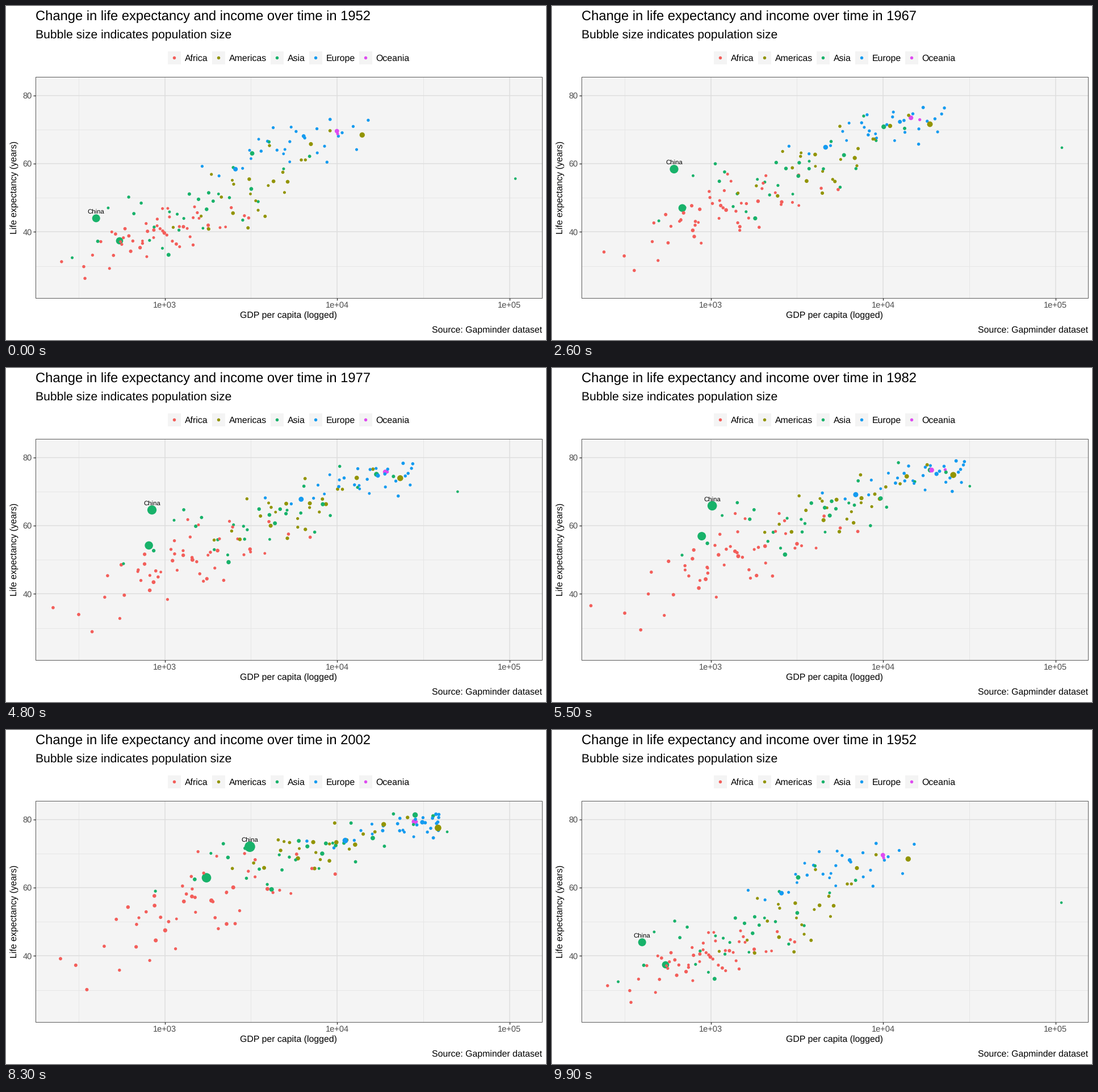
A matplotlib script for the animation above (10000 ms loop, 951 px wide and 589 px high).

```python
import numpy as np
import matplotlib.pyplot as plt
from matplotlib.animation import FuncAnimation
from matplotlib.patches import Rectangle

W, H, DPI = 951, 589, 64
PT = 72 / DPI                       # points per pixel
plt.rcParams.update({"font.family": "Liberation Sans", "text.hinting": "none"})

YEARS = np.arange(1952, 2008, 5)
SPAN = (YEARS - YEARS[0]) / 55
COLORS = {"Africa": "#F35E5A", "Americas": "#929400", "Asia": "#18B26A",
          "Europe": "#149BF0", "Oceania": "#DE4BF0"}

# Countries apart from the clouds: continent, population in millions,
# then a few key points (year, GDP, life expectancy); China comes first
LANDMARKS = [
    ("Asia", 556, [(1952, 400, 44), (1957, 576, 50.5), (1962, 488, 44.5),
                   (1967, 613, 58.4), (1972, 677, 63.1), (1982, 962, 65.5),
                   (2002, 3119, 72), (2007, 4959, 73)]),
    ("Asia", 410, [(1952, 547, 37.4), (1982, 856, 56.6), (2002, 1747, 62.9),
                   (2007, 2452, 64.7)]),
    ("Asia", 70, [(1952, 3217, 63), (1972, 14779, 73.4), (2007, 31656, 82.6)]),
    ("Asia", 0.2, [(1952, 108382, 55.6), (1972, 109348, 67.7), (1982, 31354, 71.3),
                   (2007, 47307, 77.6)]),
    ("Americas", 145, [(1952, 13990, 68.4), (1982, 25010, 74.7), (2007, 42952, 78.2)]),
    ("Africa", 2.5, [(1952, 493, 40), (1982, 882, 46.2), (1992, 737, 23.6),
                     (2007, 863, 46.2)]),
]

# Clouds: count, then first and last value of the centre and spread
# of log10 GDP and of life expectancy
CLOUDS = {
    "Africa": (51, (2.97, 3.2), (0.25, 0.37), (39.2, 56), (4.5, 9)),
    "Americas": (24, (3.53, 3.92), (0.24, 0.27), (53, 73.5), (8, 4)),
    "Asia": (29, (3.15, 3.83), (0.35, 0.42), (47, 72), (8, 6)),
    "Europe": (30, (3.74, 4.5), (0.27, 0.3), (65.5, 78.7), (5, 2.8)),
    "Oceania": (2, (4.01, 4.5), (0.03, 0.1), (69.3, 80.5), (0.3, 1)),
}
RHO = 0.65                          # link between income and life expectancy
GROWTH = 2.37                       # population growth over the whole span

# Steps of each move to the next year; three still frames come before it
STEPS = np.array([6] * 5 + [4] + [5] * 6)
STARTS = np.cumsum(STEPS + 3) - STEPS


def px(log_gdp):
    return 279.5 + 303.5 * (log_gdp - 3)


def py(life):
    return 398.4 - 6.02 * (life - 40)


def trend(first, last):
    """Change that slows down over the years."""
    return first + (last - first) * SPAN ** 0.75


def soft_cap(values, cap, softness):
    return cap - softness * np.log1p(np.exp((cap - values) / softness))


def bell(ranks, n):
    """Evenly spread, roughly normal scores."""
    p = (ranks + 1) / (n + 1)
    return np.log(p / (1 - p)) / 1.7


def build():
    """Continent of every country and its log GDP, life and population by year."""
    rng = np.random.default_rng(1952)
    rows = []
    for name, pop, points in LANDMARKS:
        years, gdp, life = zip(*points)
        rows.append((name, np.interp(YEARS, years, np.log10(gdp)),
                     np.interp(YEARS, years, life), pop))
    for name, (n, *ends) in CLOUDS.items():
        gdp_mid, gdp_dev, life_mid, life_dev = (trend(*e) for e in ends)
        u = bell(np.arange(n), n)
        v = RHO * u + np.sqrt(1 - RHO ** 2) * bell(rng.permutation(n), n)
        for i in range(n):
            gdp = gdp_mid + gdp_dev * u[i] + rng.normal(0, 0.02, YEARS.size)
            life = life_mid + life_dev * v[i] + rng.normal(0, 0.3, YEARS.size)
            rows.append((name, soft_cap(gdp, trend(4.2, 4.62), 0.08),
                         soft_cap(life, trend(73, 82.3), 1),
                         min(5 * np.exp(rng.normal()), 80)))
    names, gdps, lives, pops = zip(*rows)
    return names, np.array(gdps).T, np.array(lives).T, np.outer(GROWTH ** SPAN, pops)


names, gdps, lives, pops = build()
xs, ys = px(gdps), py(lives)
radii = 2.2 + 7.4 * np.sqrt(pops / 1318)
order = np.random.default_rng(7).permutation(len(names))

fig = plt.figure(figsize=(W / DPI, H / DPI), dpi=DPI, facecolor="white")
ax = fig.add_axes([0, 0, 1, 1])
ax.set(xlim=(0, W), ylim=(H, 0))
ax.axis("off")


def label(x, y, text, size, color="black", **kw):
    return ax.text(x, y, text, fontsize=size * PT, color=color,
                   **{"va": "baseline", **kw})


def line(x, y, color, width):
    ax.plot(x, y, color=color, lw=width * PT, zorder=1, solid_capstyle="butt")


def dot_size(radius):
    return (2 * radius * PT) ** 2


# Panel, grid and axes
L, R, T, B = 52, 943.5, 124.5, 514.5
ax.add_patch(Rectangle((L, T), R - L, B - T, fc="#F4F4F4", ec="none", zorder=0))
for g in (2.5, 3.5, 4.5):
    line([px(g)] * 2, [T, B], "#E6E6E6", 1)
for y in (30, 50, 70):
    line([L, R], [py(y)] * 2, "#E6E6E6", 1)
for g in (3, 4, 5):
    line([px(g)] * 2, [T, B], "#DEDEDE", 1.5)
    line([px(g)] * 2, [B, B + 4], "#333333", 1.4)
    label(px(g), 532, f"1e+0{g}", 14.6, "#4D4D4D", ha="center")
for y in (40, 60, 80):
    line([L, R], [py(y)] * 2, "#DEDEDE", 1.5)
    line([L - 4, L], [py(y)] * 2, "#333333", 1.4)
    label(45.5, py(y) + 5.3, str(y), 14.6, "#4D4D4D", ha="right")
ax.add_patch(Rectangle((L, T), R - L, B - T, fc="none", ec="#4A4A4A",
                       lw=0.9 * PT, zorder=5))

title = label(51.5, 25, "", 23.8)
label(51.5, 57, "Bubble size indicates population size", 21.15)
label(497.5, 550, "GDP per capita (logged)", 15.9, ha="center")
label(19, 319.5, "Life expectancy (years)", 15.9, ha="center",
      rotation=90, rotation_mode="anchor")
label(944, 575.5, "Source: Gapminder dataset", 15.9, ha="right")

# Legend
for (name, color), x in zip(COLORS.items(), (296, 374, 477, 545, 633)):
    ax.add_patch(Rectangle((x - 11.5, 80), 23, 23, fc="#F4F4F4", ec="none"))
    ax.scatter([x], [91.3], s=dot_size(2.75), color=color, lw=0, zorder=3)
    label(x + 18.5, 97, name, 15.9)

dots = ax.scatter(xs[0, order], ys[0, order], s=dot_size(radii[0, order]), lw=0,
                  c=[COLORS[names[i]] for i in order], zorder=3)
tag = label(0, 0, "China", 11.4, ha="center", zorder=6)


def position(frame):
    """Last state left, next state and the share of the way between them."""
    k = np.searchsorted(STARTS, frame, side="right") - 1
    if k < 0:
        return 0, 0, 0.0
    share = min(1.0, (frame - STARTS[k] + 1) / STEPS[k])
    return k, (k + 1) % len(YEARS), share


def draw(frame):
    a, b, t = position(frame)
    x, y, r = ((1 - t) * s[a] + t * s[b] for s in (xs, ys, radii))
    dots.set_offsets(np.column_stack([x, y])[order])
    dots.set_sizes(dot_size(r[order]))
    tag.set_position((x[0], y[0] - 7.5))
    year = YEARS[b if t >= 0.5 else a]
    title.set_text(f"Change in life expectancy and income over time in {year}")
    return dots, tag, title


anim = FuncAnimation(fig, draw, frames=100, interval=100, repeat=True, repeat_delay=0)
plt.show()
```
